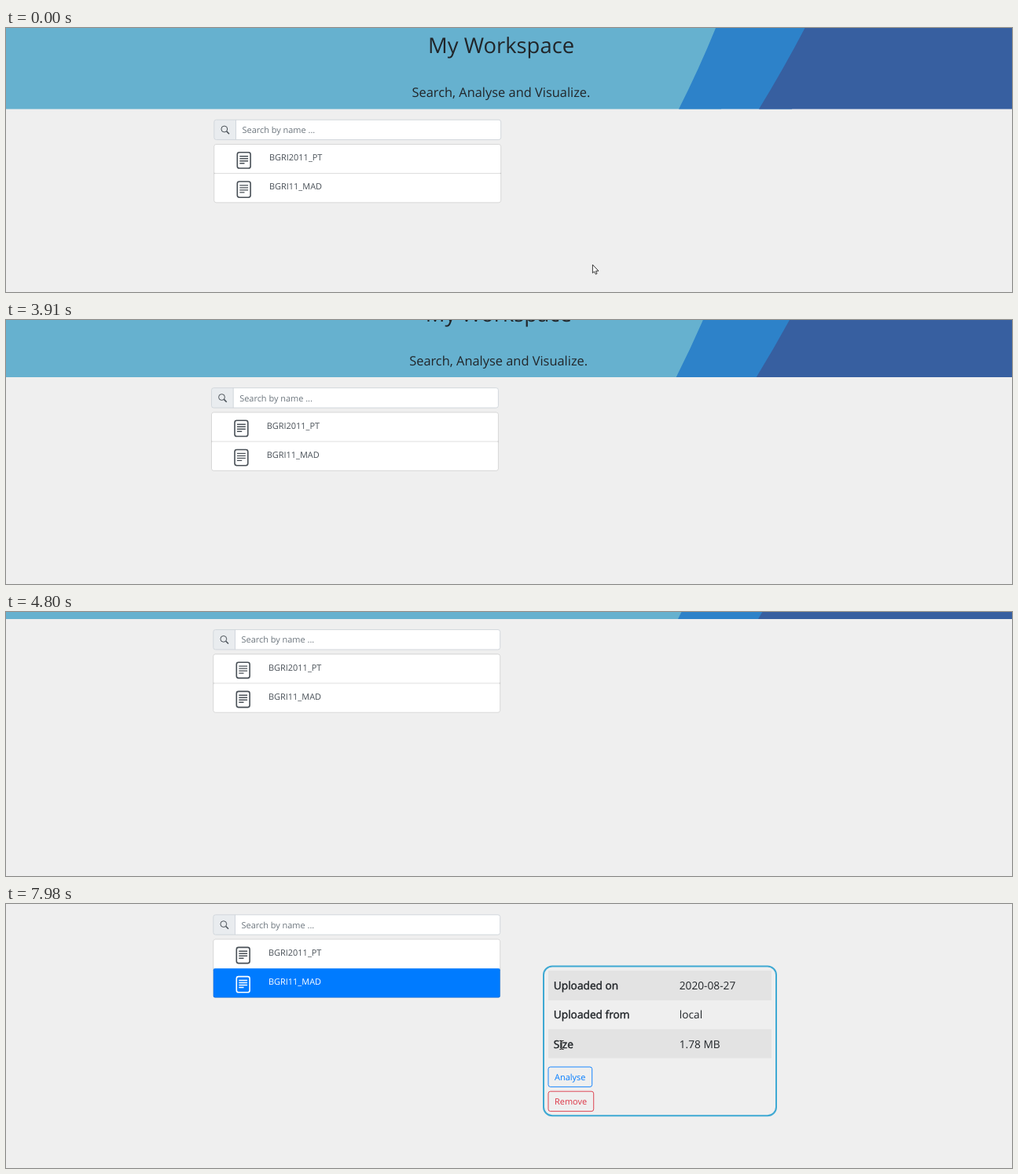
Animation of 1280x337 px, one loop 8000 ms. Source, as an HTML page:

```html
<!DOCTYPE html>
<html lang="en">
<head>
<meta charset="utf-8">
<title>My Workspace</title>
<style>
  html, body { margin: 0; height: 100%; overflow: hidden; background: #efefef; }
  svg { display: block; width: 1280px; height: 337px; font: 10.95px "Open Sans", sans-serif; text-rendering: geometricPrecision; }
  text { fill: currentColor; }
  .line { fill: none; stroke: currentColor; }
  .row { color: #495057; }
  .row rect { fill: #fff; }
  .row.hover rect { fill: #f8f9fa; }
  .row.active { color: #fff; }
  .row.active rect { fill: #007bff; }
  #panel { color: #212529; font-size: 13.7px; }
  .label { stroke: currentColor; stroke-width: .45; }
  .button { font-size: 10.95px; }
  #cursor path { stroke-linejoin: round; stroke-linecap: round; }
</style>
</head>
<body>
<svg viewBox="0 0 1280 337">
  <defs>
    <g id="doc" class="line">
      <rect x="294.3" y="158.8" width="16.8" height="20.2" rx="2.6" stroke-width="1.6"/>
      <path d="M297.3 163.7h10.8m-10.8 3h10.8m-10.8 3h10.8m-10.8 3h6.2" stroke-width="1.4"/>
    </g>
  </defs>

  <g id="page">
    <path fill="#66b1cf" d="M-10 0H910V103.5H-10z"/>
    <path fill="#2d82c9" d="M903 0Q882 51.75 856 103.5H1000L1030 0z"/>
    <path fill="#375fa0" d="M1016.500 0Q989.500 51.750 958 103.500H1300V0z"/>
    <g color="#212529">
      <text x="537" y="32" font-size="27.4">My Workspace</text>
      <text x="516.500" y="88" font-size="16.4">Search, Analyse and Visualize.</text>
    </g>

    <rect x="264.800" y="117.200" width="364.900" height="25.400" rx="2.700" fill="#fff"/>
    <path d="M292.500 117.200V142.600H267.500a2.700 2.700 0 0 1-2.700-2.700V119.900a2.700 2.700 0 0 1 2.700-2.700z" fill="#e9ecef"/>
    <g class="line" color="#ced4da" stroke-width=".9">
      <rect x="264.800" y="117.200" width="364.900" height="25.400" rx="2.700"/>
      <path d="M292.500 117.200v25.400"/>
    </g>
    <g class="line" color="#495057">
      <circle cx="277.800" cy="129" r="3.900"/>
      <path d="M280.700 131.900l3.300 3.300" stroke-width="1.500"/>
    </g>
    <text x="300.500" y="134" color="#6c757d">Search by name ...</text>

    <g class="row">
      <rect x="264.800" y="148.500" width="364.900" height="37.100" rx="2"/>
      <use href="#doc"/>
      <text x="335" y="169.200">BGRI2011_PT</text>
    </g>
    <g class="row">
      <rect x="264.800" y="185.600" width="364.900" height="37.200" rx="2"/>
      <use href="#doc" y="37.200"/>
      <text x="335" y="206.400">BGRI11_MAD</text>
    </g>
    <g class="line" color="#000" stroke-opacity=".14" stroke-width=".9">
      <rect x="264.800" y="148.500" width="364.900" height="74.300" rx="2.700"/>
      <path id="divider" d="M264.800 185.600h364.900"/>
    </g>
  </g>

  <g id="panel">
    <rect class="line" x="684" y="79.500" width="296" height="190.700" rx="11" color="#3fa9d3" stroke-width="2"/>
    <path d="M690 85h284v38H690zM690 159.800h284v37H690z" fill="#e3e3e3"/>
    <g class="label">
      <text x="696.800" y="109">Uploaded on</text>
      <text x="696.800" y="146.300">Uploaded from</text>
      <text x="696.800" y="183.500">Size</text>
    </g>
    <text x="856.800" y="109">2020-08-27</text>
    <text x="856.800" y="146.300">local</text>
    <text x="856.800" y="183.500">1.78 MB</text>
    <g class="button" color="#007bff">
      <rect class="line" x="690" y="208" width="55.700" height="25.400" rx="2.700" stroke-width=".9"/>
      <text x="698" y="224.800">Analyse</text>
    </g>
    <g class="button" color="#dc3545">
      <rect class="line" x="690" y="239.200" width="57.700" height="25.400" rx="2.700" stroke-width=".9"/>
      <text x="698" y="256">Remove</text>
    </g>
  </g>

  <g id="cursor" fill="#fff" stroke="#222">
    <path id="arrow" d="M.4 .5V10.800L2.700 8.800L4.300 12.300L6 11.500L4.500 8.100H7.600z" stroke-width=".9"/>
    <path id="hand" d="M-1.200 9.800V1.500Q-1 .2 .2 .3Q1.400 .3 1.500 1.500V6Q3.300 5 3.900 6.500Q5.500 5.700 6.100 7.200Q8 6.800 8 8.500V11.500Q7.900 13.500 6.600 15.600H-.2Q-1.200 13.800-2.800 12.100L-4.800 9.700Q-5.100 8.300-3.800 8.100Q-2.500 8.200-1.200 9.800zM1.500 6v2.500M3.900 6.500v2.200M6.100 7.200v1.700"/>
    <path id="beam" d="M-2.200-5.600Q-.3-5.600 0-4.800Q.3-5.600 2.200-5.600M0-4.800V4.800M-2.200 5.600Q-.3 5.600 0 4.800Q.3 5.600 2.200 5.600" fill="none"/>
  </g>
</svg>
<script>
  const LOOP = 8000, CLICK = 6600, FADE = 220;
  const $ = id => document.getElementById(id);
  const rows = document.querySelectorAll('.row');

  // Keys: [time, x, y]
  const scroll = [[3540, 0, 0], [3910, -3.3, -30.4], [4350, -1.8, -82.2], [4800, -1, -94.6], [5230, -1, -103.4]];
  const pointer = [
    [1090, 746, 302], [1200, 747.5, 310.5], [1520, 622, 178], [1910, 570, -7], [1930, 569, -14],
    [5600, 566, -10], [6030, 490, 56], [6400, 464, 97.5], [7110, 464, 97.5], [7930, 701, 156], [7980, 707, 180]
  ];

  // Monotone cubic through the keys, at rest at both ends
  function track(keys, t, c) {
    const last = keys.length - 1;
    if (t <= keys[0][0]) return keys[0][c];
    if (t >= keys[last][0]) return keys[last][c];
    const rate = i => (keys[i + 1][c] - keys[i][c]) / (keys[i + 1][0] - keys[i][0]);
    const slope = i => {
      if (i === 0 || i === last) return 0;
      const a = rate(i - 1), b = rate(i);
      return a * b > 0 ? 2 * a * b / (a + b) : 0;
    };
    const i = keys.findIndex(k => k[0] > t) - 1;
    const span = keys[i + 1][0] - keys[i][0], u = (t - keys[i][0]) / span, v = 1 - u;
    return keys[i][c] * v * v * (1 + 2 * u) + keys[i + 1][c] * u * u * (3 - 2 * u)
      + span * u * v * (slope(i) * v - slope(i + 1) * u);
  }

  function draw(t) {
    const sx = track(scroll, t, 1), sy = track(scroll, t, 2);
    const x = track(pointer, t, 1), y = track(pointer, t, 2);
    const shown = t < 1930 || t >= 5610, clicked = t >= CLICK;
    const px = x - sx, py = y - sy;
    const inColumn = px > 264.8 && px < 629.7;
    const hovered = !shown || !inColumn || py < 148.5 || py > 222.8 ? -1 : +(py > 185.6);
    const overText = inColumn && px > 292 && py > 117 && py < 142.6
      || clicked && x > 697 && x < 793 && (Math.abs(y - 141) < 9 || Math.abs(y - 179) < 9 && x < 722);
    const kind = hovered >= 0 ? 'hand' : overText ? 'beam' : 'arrow';

    $('page').setAttribute('transform', `translate(${sx} ${sy})`);
    rows.forEach((row, i) => {
      row.classList.toggle('hover', i === hovered);
      row.classList.toggle('active', clicked && i === 1);
    });
    $('divider').style.opacity = clicked ? 0 : 1;
    $('panel').style.opacity = Math.min(1, Math.max(0, (t - CLICK + 20) / FADE));
    $('cursor').style.display = shown ? '' : 'none';
    $('cursor').setAttribute('transform', `translate(${x} ${y})`);
    for (const id of ['arrow', 'hand', 'beam']) $(id).style.display = id === kind ? '' : 'none';
  }

  function tick() {
    draw(performance.now() % LOOP);
    requestAnimationFrame(tick);
  }
  tick();
</script>
</body>
</html>
```
